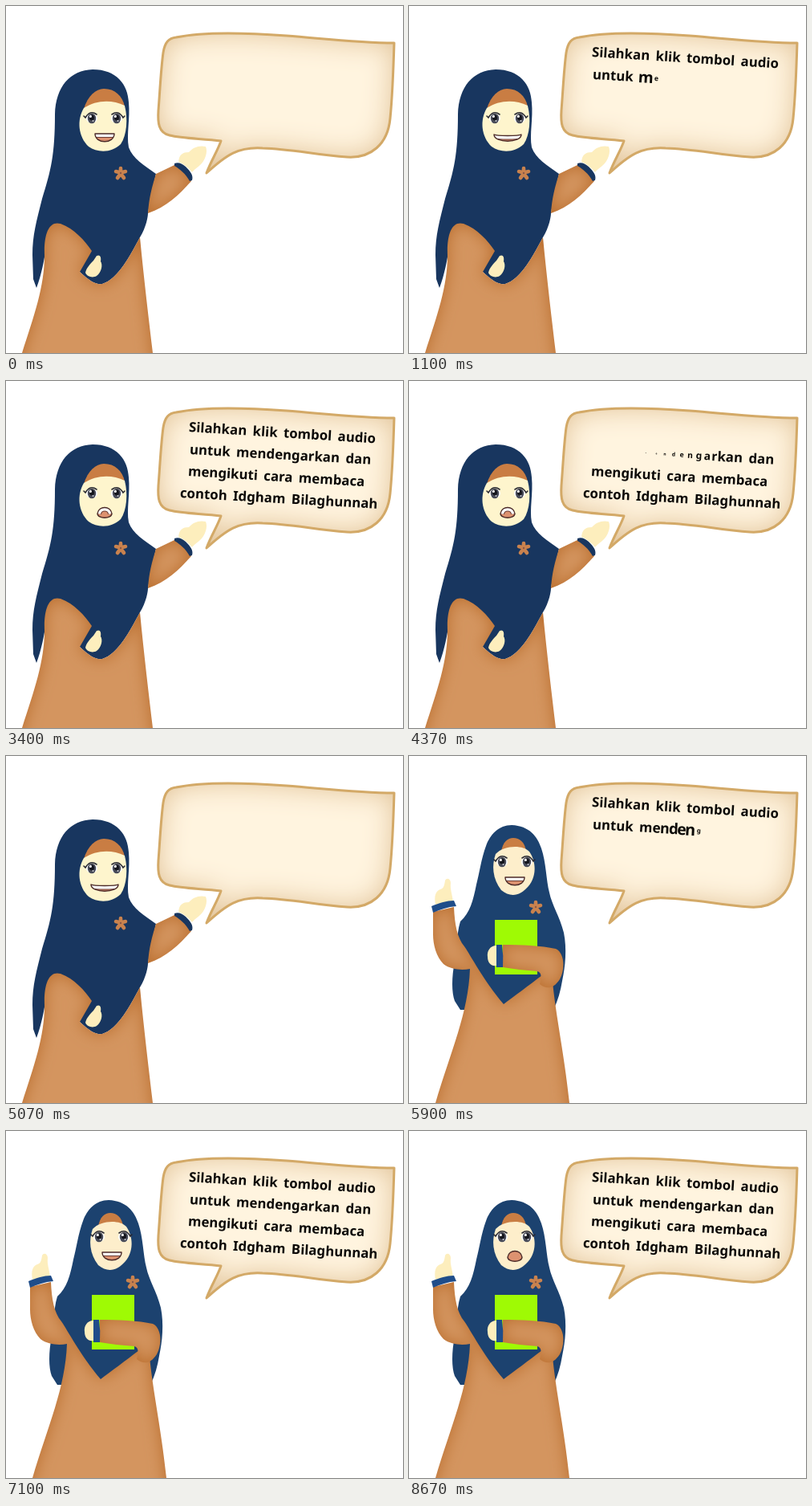
Write an HTML page with a canvas that moves like this. It is 495 px wide and 432 px high and loops after 8.71 s.

```html
<!DOCTYPE html>
<html lang="id">
<head>
<meta charset="utf-8">
<style>
  html, body { margin: 0; width: 100%; height: 100%; overflow: hidden; background: #fff; }
  svg, canvas { position: absolute; left: 0; top: 0; }
  .navy { fill: #18365f; }
  .blue { fill: #1c426f; }
  .cuff { fill: #1f4d8a; }
  .cloth { fill: #d4955f; filter: url(#clothShade); }
  .skin { fill: #fdeebd; }
  .face { fill: #fef5cd; }
  #point .face { fill: #fdeecb; }
  .cap { fill: #c97d43; }
</style>
</head>
<body>
<svg width="495" height="432" viewBox="0 0 495 432">
  <defs>
    <filter id="clothShade" color-interpolation-filters="sRGB">
      <feGaussianBlur in="SourceAlpha" stdDeviation="10" result="soft"/>
      <feFlood flood-color="#b96c2b"/>
      <feComposite operator="out" in2="soft"/>
      <feComposite operator="atop" in2="SourceGraphic"/>
    </filter>
    <filter id="paperShade" color-interpolation-filters="sRGB">
      <feGaussianBlur in="SourceAlpha" stdDeviation="17" result="soft"/>
      <feFlood flood-color="#e0c297"/>
      <feComposite operator="out" in2="soft"/>
      <feComposite operator="atop" in2="SourceGraphic"/>
    </filter>
    <path id="bubble" d="M212 39C250 31 310 34 350 37C400 41 440 46 484 46C483 80 482 110 479 140C476 172 455 190 425 188C385 185 355 178 320 177C290 175 275 185 250 208C256 192 264 180 268 168C245 165 220 165 204 161C190 158 189 145 190 130C192 105 193 80 196 58C198 45 203 40 212 39Z"/>
    <g id="flower" stroke="#c9824e" stroke-width="4.6" stroke-linecap="round">
      <path d="M0-2V-6M2-1L6-2M1 2L4 6M-1 2L-4 6M-2-1L-6-2"/>
      <circle r="1.2" fill="#8a5a48" stroke="none"/>
    </g>
  </defs>

  <use href="#bubble" fill="#fff4df" filter="url(#paperShade)"/>
  <use href="#bubble" fill="none" stroke="#d3a967" stroke-width="3" stroke-linejoin="round"/>

  <g id="greet">
    <path class="navy" d="M108 79C80 80 62 100 61 135C61 185 56 205 45 240C38 268 33 285 33 310L34 340L38 351C44 335 48 315 50 300L92 331C105 343 112 347 120 346C140 340 155 310 167 288C175 275 177 262 177 258L180 240L187 209C172 198 158 190 153 176C150 160 155 140 153 120C152 98 138 79 108 79Z"/>
    <path class="cloth" d="M48 310C47 283 54 267 68 271C85 277 98 292 107 305L92 331C105 343 112 347 120 346C140 340 155 310 167 288C172 340 178 390 183 432L188 460H12L20 432C35 385 48 350 48 310Z"/>
    <path class="skin" d="M113 311C117 309 119 312 118 318C121 322 119 332 113 336C108 339 101 337 99 332C100 326 106 320 109 317Z"/>
    <path class="skin" d="M215 194C216 185 220 182 228 182C233 176 241 173 249 175C252 182 248 192 243 197C238 202 234 204 232 207C228 202 222 197 215 194Z"/>
    <path class="cloth" d="M187 209L210 198C218 203 226 210 231 218C215 236 200 250 177 258C178 240 182 225 187 209Z"/>
    <path class="navy" d="M210 196C215 194 219 196 224 200C230 206 234 211 232 217L229 218C224 209 217 203 210 199Z"/>
    <path class="cap" d="M97 128C102 112 112 103 122 103C136 103 145 112 148 125Z"/>
    <path class="face" d="M97 127C112 117 132 116 148 124C152 140 151 160 143 172C132 183 114 183 103 175C90 163 88 142 97 127Z"/>
    <use href="#flower" x="143" y="208"/>
  </g>

  <g id="point">
    <path class="blue" d="M128 86C112 86 101 98 96 112C90 128 88 145 84 160C80 180 76 195 64 206C58 225 62 240 57 256C53 275 53 295 57 305L64 316H180C186 304 189 292 191 280C195 262 197 240 193 220C188 200 178 185 175 170C171 155 171 132 165 115C160 100 150 87 128 86Z"/>
    <path class="skin" d="M33 185C31 175 33 168 39 166C43 165 44 162 45 155C47 151 52 153 52 158C51 166 54 172 55 182Z"/>
    <path class="cloth" d="M30 194L56 188C57 210 60 226 69 237C78 250 92 278 118 309C130 300 150 285 166 273L178 268C181 315 193 365 200 432L204 460H24L33 432C52 368 74 320 76 265C66 267 52 266 43 259C34 250 30 235 30 222Z"/>
    <path class="cuff" d="M28 187C38 183 47 180 56 180L59 187C48 188 39 191 30 195Z"/>
    <rect x="107" y="204" width="53" height="68" fill="#9ffa04"/>
    <path class="cloth" d="M117 235C140 235 165 236 183 240C194 245 195 265 188 278C180 290 172 291 163 284C165 276 166 270 160 268C145 267 130 265 117 263Z"/>
    <path class="cuff" d="M109 235H116Q118 249 117 263H109Z"/>
    <path class="skin" d="M109 236C101 236 97 243 98 250C98 258 103 262 109 261Z"/>
    <path class="cap" d="M115 119C117 107 123 102 130 102C138 102 144 107 146 118Z"/>
    <path class="face" d="M108 122C118 111 142 110 150 119C159 132 159 150 149 162C138 175 126 176 115 167C104 153 103 136 108 122Z"/>
    <use href="#flower" x="158" y="188"/>
  </g>
</svg>
<canvas width="495" height="432"></canvas>
<script>
const LOOP = 8710, SWITCH = 5270, STEP = 100;
const ctx = document.querySelector('canvas').getContext('2d');
const greet = document.getElementById('greet'), point = document.getElementById('point');

// text, left x, baseline y, slope
const lines = [
  ['Silahkan klik tombol audio', 228, 63, .062],
  ['untuk mendengarkan dan', 229, 91, .056],
  ['mengikuti cara membaca', 227, 118, .06],
  ['contoh Idgham Bilaghunnah', 217, 145, .056]
];
const font = 'bold 16.8px "Noto Sans", sans-serif';
ctx.font = font;
ctx.wordSpacing = '3px';
const letters = lines.flatMap(([text, x, y, slope]) => [...text].map((char, i) => {
  const dx = ctx.measureText(text.slice(0, i + 1)).width - ctx.measureText(char).width / 2;
  return { char, x: x + dx, y: y + dx * slope, angle: Math.atan(slope) };
}));

// half width, corner y, top bend, bottom reach, teeth
const grin = [12, -4, 0, 9, 4], open = [9, 2, -10, 9, 0],
      talk = [9, 2, -10, 9, 4], wide = [17, -3, 2, 8, 4];
const speech = [
  [grin, talk, wide, open, talk, wide],
  [grin, talk, wide, talk, open, wide]
];

const clamp = v => Math.max(0, Math.min(1, v));

function mouthAt(t, poses) {
  const n = Math.floor(t / STEP), mix = clamp((t / STEP - n - .75) * 4);
  const from = poses[n % 6], to = poses[(n + 1) % 6];
  return from.map((v, i) => v + (to[i] - v) * mix);
}

function drawMouth([w, top, bend, reach, teeth]) {
  const upper = new Path2D(), whole = new Path2D();
  for (const path of [upper, whole]) {
    path.moveTo(-w, top);
    path.bezierCurveTo(-w * .8, top + bend, w * .8, top + bend, w, top);
  }
  whole.bezierCurveTo(w, reach, -w, reach, -w, top);
  whole.closePath();
  ctx.save();
  ctx.translate(123, 163);
  ctx.fillStyle = '#dd9270';
  ctx.fill(whole);
  ctx.save();
  ctx.clip(whole);
  if (teeth > .2) {
    ctx.lineWidth = teeth * 2 + 2;
    ctx.strokeStyle = '#6b3b33';
    ctx.stroke(upper);
    ctx.lineWidth = teeth * 2;
    ctx.strokeStyle = '#fff';
    ctx.stroke(upper);
  }
  ctx.restore();
  ctx.lineWidth = 1.4;
  ctx.lineJoin = 'round';
  ctx.strokeStyle = '#4b2a28';
  ctx.stroke(whole);
  ctx.restore();
}

function drawEye(x, side, closed) {
  ctx.save();
  ctx.translate(x, 140);
  ctx.scale(side, 1);
  ctx.strokeStyle = '#292a33';
  ctx.lineWidth = 1.6;
  ctx.lineCap = 'round';
  const dot = (px, py, rx, ry, color) => {
    ctx.beginPath();
    ctx.ellipse(px, py, rx, ry, 0, 0, 7);
    ctx.fillStyle = color;
    ctx.fill();
  };
  if (!closed) {
    dot(0, 0, 7, 6, '#fff');
    dot(0, 0, 5.2, 6.3, '#484b58');
    dot(0, -1, 3, 3.6, '#15161d');
    dot(-1.6 * side, -2.6, 1.5, 1.7, '#fff');
    dot(1.5 * side, 3, 1, 1, '#c9ccd5');
  }
  ctx.beginPath();
  ctx.moveTo(-10, closed ? 1 : -3);
  ctx.lineTo(-8, closed ? 2 : -1);
  ctx.quadraticCurveTo(-2, closed ? 7 : -11, 6, closed ? 2 : -5);
  ctx.stroke();
  ctx.restore();
}

// Letters pop past full size, then settle.
function popScale(age) {
  return age < 20 ? clamp(age / 20) * 1.2 : 1 + .2 * clamp((100 - age) / 80);
}

function drawText(t, second) {
  ctx.font = font;
  ctx.textAlign = 'center';
  ctx.fillStyle = '#0b0907';
  letters.forEach(({ char, x, y, angle }, i) => {
    let size = popScale(second ? t - i * 16.4 : t - 10 - i * 32.8);
    if (!second) size *= 1 - clamp((t - 3940 - i * 10.6) / 100);
    if (size <= 0) return;
    ctx.save();
    ctx.translate(x, y - 5);
    ctx.rotate(angle);
    ctx.scale(size, size);
    ctx.fillText(char, 0, 5);
    ctx.restore();
  });
}

const start = performance.now();
function frame() {
  const now = (performance.now() - start) % LOOP;
  const second = now >= SWITCH;
  const t = second ? now - SWITCH : now;
  greet.style.display = second ? 'none' : '';
  point.style.display = second ? '' : 'none';
  ctx.clearRect(0, 0, 495, 432);
  ctx.save();
  if (second) ctx.translate(9, -8);
  const closed = t % 1000 > 930 && now < 8000;
  drawEye(107, 1, closed);
  drawEye(138, -1, closed);
  drawMouth(mouthAt(t, speech[+second]));
  ctx.restore();
  drawText(t, second);
  requestAnimationFrame(frame);
}
frame();
</script>
</body>
</html>
```
